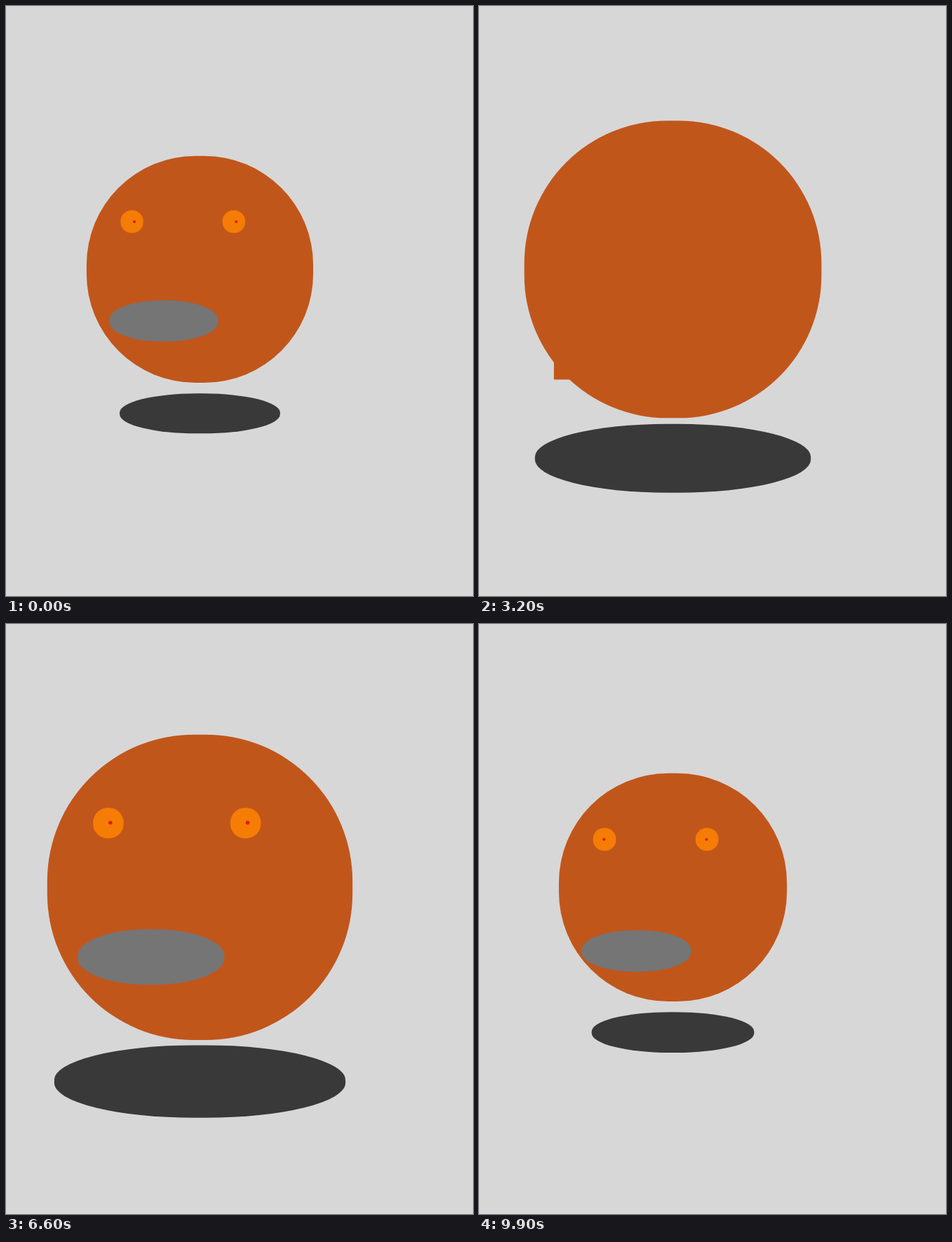
Animation of 666 by 841 pixels, one loop 10000 ms. Source, as an HTML page with a canvas:

```html
<!DOCTYPE html>
<html lang="en">
<head>
<meta charset="utf-8">
<title>Floating face</title>
<style>
  html, body { margin: 0; width: 100%; height: 100%; overflow: hidden; background: #d7d7d7; }
  canvas { display: block; }
</style>
</head>
<body>
<canvas id="stage" width="666" height="841"></canvas>
<script>
const LOOP = 10000, STEP = 100;
const CX = 276.5, CY = 375.4, SIZE = 323.2;
const BACK = '#d7d7d7', BALL = '#c1561b', EYE = '#f57c05';
const PUPIL = '#e01c05', MOUTH = '#757575', SHADOW = '#393939';
const ctx = document.getElementById('stage').getContext('2d');

// cubic-bezier(.25, .1, .25, 1)
function ease(x) {
  if (x <= 0) return 0;
  if (x >= 1) return 1;
  const curve = (u, a, b) => 3 * u * (1 - u) * (1 - u) * a + 3 * u * u * (1 - u) * b + u * u * u;
  let lo = 0, hi = 1;
  for (let i = 0; i < 24; i++) {
    const mid = (lo + hi) / 2;
    if (curve(mid, .25, .25) < x) lo = mid; else hi = mid;
  }
  return curve(lo, .1, 1);
}

const wave = (t, period) => Math.cos(2 * Math.PI * t / period);

// True for `length` ms from `from` on, once per period
function blinks(t, period, from, length) {
  const phase = t % period;
  return phase >= from && phase < from + length;
}

// Short smooth rise to 1 and back, once per period
function hop(t, period, peak, reach) {
  const d = Math.abs(t % period - peak) / reach;
  return d < 1 ? Math.cos(d * Math.PI / 2) ** 2 : 0;
}

// Box given by its centre, relative to the ball's centre
function blob(x, y, w, h, color, round = .48) {
  ctx.fillStyle = color;
  ctx.beginPath();
  ctx.roundRect(x - w / 2, y - h / 2, w, h, { x: w * round, y: h * round });
  ctx.fill();
}

function drawMouth(t) {
  const y = 73.5 + 8.5 * (1 - wave(t, 6400));
  const shut = blinks(t, 4100, 3000, 400);
  blob(-51.7, y, 155.4, 58.8, shut ? BALL : MOUTH, shut ? 0 : .48);
}

function drawEyes(t) {
  if (blinks(t, LOOP, 3100, 300)) return;
  const dx = 3.4 * wave(t, 7700);
  const dy = -90 * hop(t, 4900, 2100, 420);
  for (const x of [-96.9, 48.4]) {
    blob(x, -68, 32.4, 32.4, EYE);
    blob(x + dx, -68 + dy, 4, 4, PUPIL);
  }
}

function draw(t) {
  const swell = ease((t - 935) / 5000) - ease((t - 5950) / 4700);
  const scale = 1 + (Math.SQRT2 - 1) * swell;

  ctx.setTransform(1, 0, 0, 1, 0, 0);
  ctx.fillStyle = BACK;
  ctx.fillRect(0, 0, 666, 841);
  ctx.setTransform(scale, 0, 0, scale, CX, CY);

  blob(0, 205.4, 228.8 * scale, 57 * scale, SHADOW);
  blob(0, 0, SIZE, SIZE, BALL);
  drawMouth(t);
  drawEyes(t);
}

const start = performance.now();
function tick() {
  const t = (performance.now() - start) % LOOP;
  draw(Math.floor(t / STEP) * STEP);
  requestAnimationFrame(tick);
}
tick();
</script>
</body>
</html>
```
